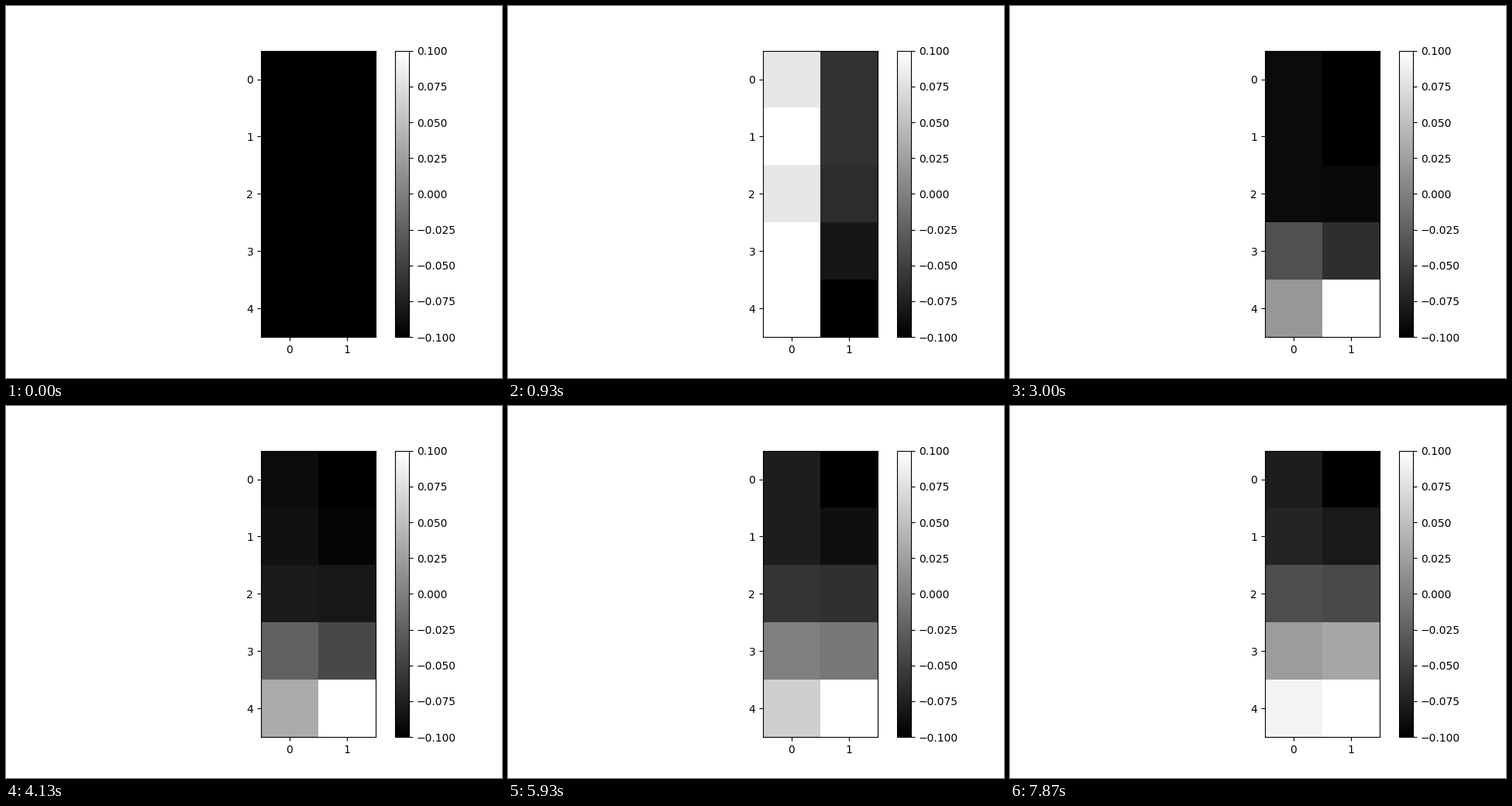
Recreate the animation shown at these times as a matplotlib script. Size 640x480 px, loop 8 s.

```python
import numpy as np
import matplotlib.pyplot as plt
from matplotlib.animation import FuncAnimation

LOOP, DT = 8000, 40
FIRST, REWARD = 66, 1000    # ms: first visit, reward found in the last row
ROW_TIME = 180              # ms spent on each row while exploring
UPDATES = 7.5               # table updates per second after the reward


def explore(t):
    """Go down the rows; the right action costs more the further it goes."""
    depth = np.zeros((5, 2))
    reached = min(5, int((t - FIRST) // ROW_TIME) + 1)
    for row in range(reached):
        depth[row, 1] = max(205, 255 - 22 * (4 - row))
        if row in (0, 2):
            depth[row, 0] = 24
    return 255 * (1 - depth / depth.max())


def learn(t):
    """The reward spreads from the last row upwards, weaker in each row."""
    s = np.floor(t / 1000 * UPDATES) / UPDATES

    def ramp(base, rate, floor=0):
        return max(floor, base + rate * (s - 2.9))

    # The first row drops again and again as the start is revisited
    idle = 11 if (s - 2.6) % 3.3 < 1.75 else 29
    left = [idle,
            ramp(11, 5.5, idle),
            ramp(11, 14, idle),
            min(ramp(80, 38, 34), ramp(80, 15.7)),
            np.interp(s, [1.1, 1.7, 2.9, 7.8], [34, 216, 150, 244])]
    right = [0, ramp(0, 5.3), ramp(9, 13.5), ramp(45, 25, 45), 255]
    return np.column_stack([left, right])


def levels(t):
    if t < FIRST:
        return np.zeros((5, 2))
    return explore(t) if t < REWARD else learn(t)


def to_value(gray):
    return gray / 255 * 0.2 - 0.1


fig, ax = plt.subplots(figsize=(6.4, 4.8), dpi=100)
image = ax.imshow(to_value(levels(0)), cmap="gray", vmin=-0.1, vmax=0.1)
ax.set_xticks([0, 1])
ax.set_yticks(range(5))
fig.colorbar(image)


def update(i):
    image.set_data(to_value(levels(i * DT)))
    return [image]


anim = FuncAnimation(fig, update, frames=LOOP // DT, interval=DT,
                     repeat=True, repeat_delay=0)
plt.show()
```
